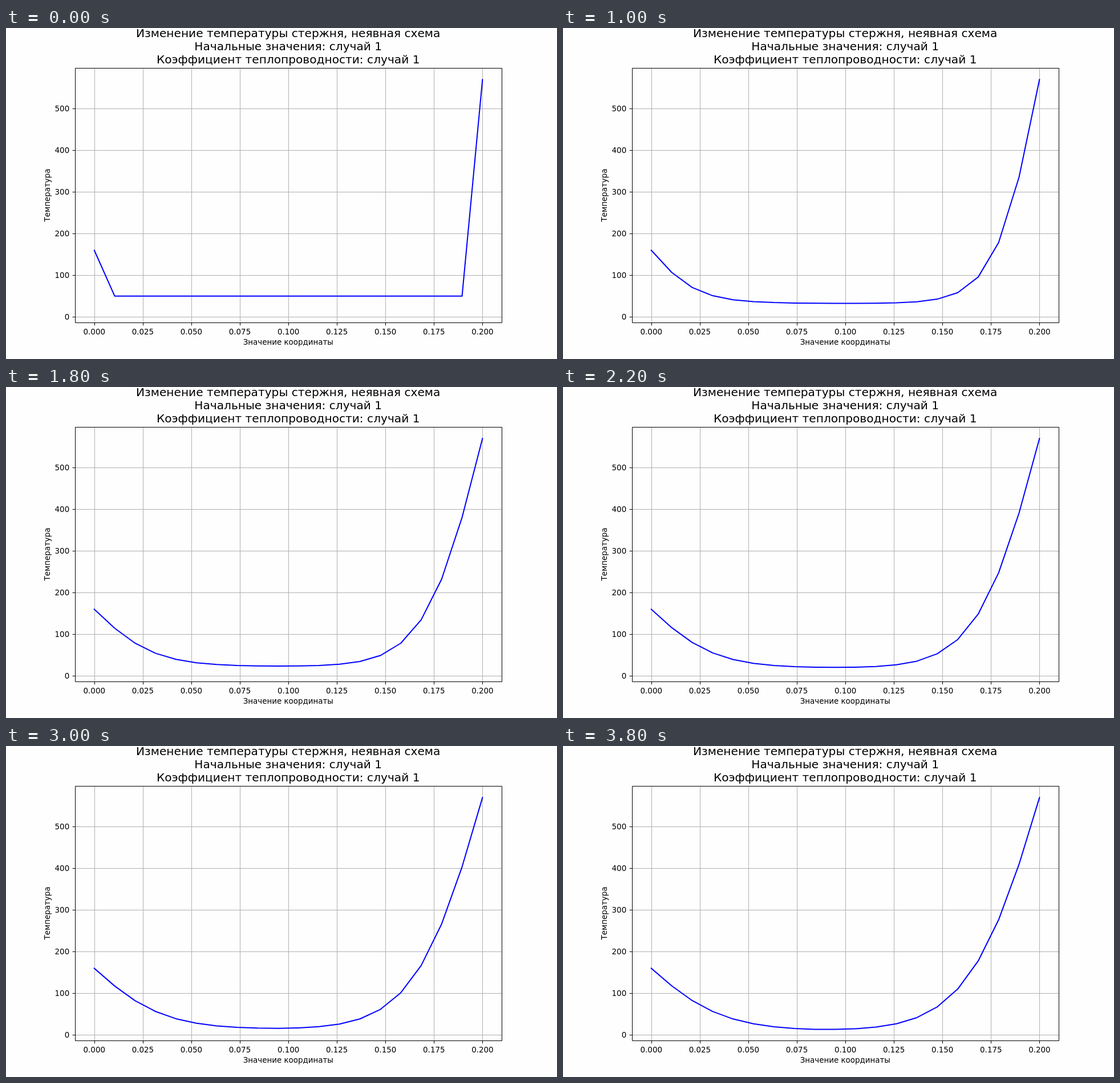
Animation of 966 by 580 pixels, one loop 4000 ms. Source, as an HTML page:

```html
<!DOCTYPE html>
<html lang="ru">
<head>
<meta charset="utf-8">
<title>Температура стержня</title>
<style>
  html, body { margin: 0; width: 966px; height: 580px; overflow: hidden; background: #fefefe; }
  svg { display: block; font: 13.42px "DejaVu Sans", sans-serif; }
  .title { font-size: 20.15px; }
</style>
</head>
<body>
<svg id="chart" width="966" height="580" viewBox="0 0 966 580"></svg>
<script>
const chart = document.getElementById('chart');
const STEP_MS = 200, STEPS = 20, LAST = 19;
const LEFT_TEMP = 160, RIGHT_TEMP = 570, START_TEMP = 50;
const CONDUCTION = 0.38, COOLING = 0.09;
const BOX = { left: 121.5, right: 869.5, top: 70.5, bottom: 516.5 };

const xOf = position => 154.78 + position / 0.2 * 680.59;
const yOf = temp => 506.3 - temp * 0.7298;

function add(tag, attrs, text = '') {
  const el = document.createElementNS('http://www.w3.org/2000/svg', tag);
  for (const name in attrs) el.setAttribute(name, attrs[name]);
  el.textContent = text;
  return chart.appendChild(el);
}
const stroke = (d, color) => add('path', { d, stroke: color, fill: 'none' });
const label = (text, x, y, anchor = 'middle', extra = {}) =>
  add('text', { x, y, 'text-anchor': anchor, ...extra }, text);

// Axes
for (let i = 0; i <= 8; i++) {
  const value = i * 0.025, x = Math.round(xOf(value)) + 0.5;
  stroke(`M${x} ${BOX.top}V${BOX.bottom}`, '#b0b0b0');
  stroke(`M${x} ${BOX.bottom}v4.9`, '#000');
  label(value.toFixed(3), xOf(value), 536.5);
}
for (let value = 0; value <= 500; value += 100) {
  const y = Math.floor(yOf(value)) + 0.5;
  stroke(`M${BOX.left} ${y}H${BOX.right}`, '#b0b0b0');
  stroke(`M${BOX.left} ${y}h-4.9`, '#000');
  label(value, 111.2, yOf(value) + 5, 'end');
}
const curve = add('polyline', {
  fill: 'none', stroke: '#00f', 'stroke-width': 2.01,
  'stroke-linejoin': 'round', 'stroke-linecap': 'square'
});
stroke(`M${BOX.left} ${BOX.top}H${BOX.right}V${BOX.bottom}H${BOX.left}Z`, '#000');

// Captions
['Изменение температуры стержня, неявная схема',
 'Начальные значения: случай 1',
 'Коэффициент теплопроводности: случай 1'
].forEach((line, i) => label(line, 494.7, 15.5 + i * 23.4, 'middle', { class: 'title' }));
label('Значение координаты', 494.8, 555);
label('Температура', 0, 0, 'middle', { transform: 'translate(76.5 293) rotate(-90)' });

// Heat loss is strongest at the middle of the rod and fades towards its ends
const coolingAt = node => COOLING * (1 - Math.abs(2 * node / LAST - 1) ** 2.5);

// One implicit step of heat conduction, solved by Gauss-Seidel sweeps
function advance(previous) {
  const temps = [...previous];
  for (let sweep = 0; sweep < 50; sweep++) {
    for (let i = 1; i < LAST; i++) {
      temps[i] = (previous[i] + CONDUCTION * (temps[i - 1] + temps[i + 1])) /
        (1 + 2 * CONDUCTION + coolingAt(i));
    }
  }
  return temps;
}

const startTemps = Array(LAST + 1).fill(START_TEMP);
startTemps[0] = LEFT_TEMP;
startTemps[LAST] = RIGHT_TEMP;
const history = [startTemps];
while (history.length < STEPS) history.push(advance(history[history.length - 1]));

function draw(ms) {
  const temps = history[Math.floor(ms / STEP_MS) % STEPS];
  const points = temps.map((temp, i) =>
    `${xOf(i * 0.2 / LAST).toFixed(2)},${yOf(temp).toFixed(2)}`);
  curve.setAttribute('points', points.join(' '));
}

const start = performance.now();
function tick() {
  draw(performance.now() - start);
  requestAnimationFrame(tick);
}
tick();
</script>
</body>
</html>
```
